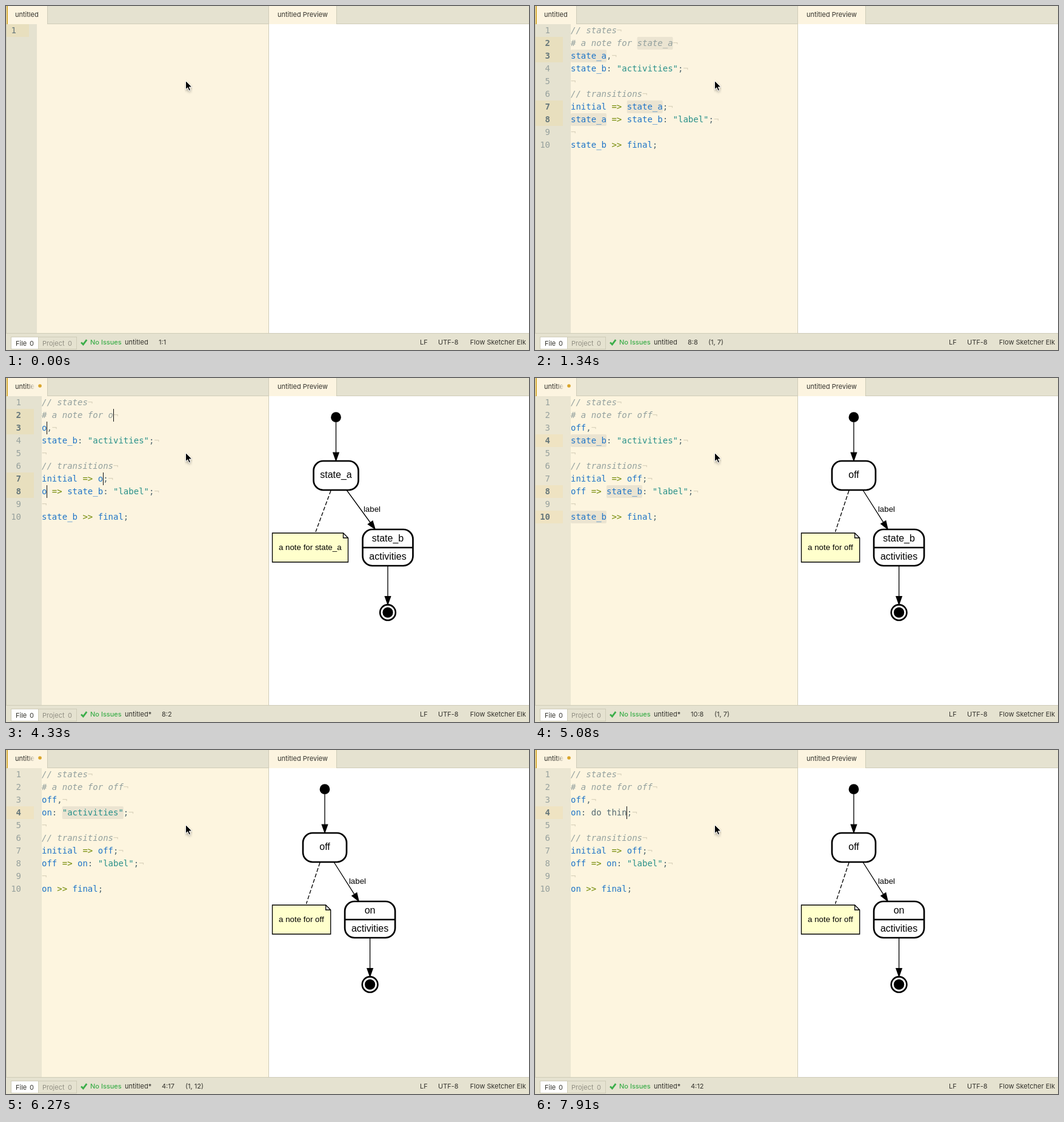
An HTML page that plays this animation: 863x568 px, repeating every 8000 ms.

```html
<!DOCTYPE html>
<html lang="en">
<head>
<meta charset="utf-8">
<title>Editor with live preview</title>
<style>
html, body { margin: 0; width: 863px; height: 568px; overflow: hidden; background: #fff; }
svg { display: block; }
text { white-space: pre; }
.ui { font: 11px Inter, sans-serif; fill: #33322c; }
.code { font: 14px "DejaVu Sans Mono", monospace; }
.chart { font: 16px "Liberation Sans", Arial, sans-serif; text-anchor: middle; }
.chart .small { font-size: 13.33px; }
</style>
</head>
<body>
<svg id="stage" width="863" height="568" viewBox="0 0 863 568"></svg>
<script>
const LOOP = 8000, CHAR = 8.428, ROW = 21, TOP = 30;
const BAR = '#e5e2d0', PAPER = '#fcf4e0', EDGE = '#cfccb8', INK = '#536870';
const BLUE = '#2075c7', TEAL = '#2a918a', OLIVE = '#738a05', GREY = '#93a09e';

const SCRIPT = ['// states', '# a note for {a}', '{a},', '{b}: {c};', '', '// transitions',
  'initial => {a};', '{a} => {b}: "label";', '', '{b} >> final;'];

// Each step changes only the listed properties and keeps the rest.
const steps = [
  [0, { word: '', pos: '1:1', sel: '', caret: false }],
  [150, { caret: true }],
  [450, { caret: false }],
  [750, { caret: true, word: 'f', pos: '1:2', popup: ['fsm', 'fselk skeleton', 1, 12, 202] }],
  [900, { word: 'fs', pos: '1:3', popup: ['fsm', 'fselk skeleton', 2, 12, 202] }],
  [1050, { word: 'fsm', pos: '1:4', popup: ['fsm', 'fselk skeleton', 3, 12, 202] }],
  [1340, { full: true, popup: null, a: 'state_a', b: 'state_b', c: '"activities"', focus: 'a', caret: false, pos: '8:8', sel: '(1, 7)' }],
  [1640, { dirty: 0.5, chart: ['state_a', 'state_b'] }],
  [1790, { dirty: 1 }],
  [4330, { a: 'o', caret: true, pos: '8:2', sel: '' }],
  [4480, { a: 'of', pos: '8:3' }],
  [4780, { a: 'off', pos: '8:4' }],
  [5080, { focus: 'b', caret: false, pos: '10:8', sel: '(1, 7)', chart: ['off', 'state_b'], late: true }],
  [5530, { b: 'o', caret: true, pos: '10:2', sel: '' }],
  [5670, { b: 'on', pos: '10:3' }],
  [6120, { chart: ['off', 'on'] }],
  [6270, { focus: 'c', caret: false, pos: '4:17', sel: '(1, 12)' }],
  [7020, { c: 'do', caret: true, pos: '4:7', sel: '' }],
  [7320, { c: 'do ', pos: '4:8' }],
  [7610, { c: 'do t', pos: '4:9', popup: ['trans', 'full transition', 1, 79, 227] }],
  [7760, { c: 'do th', pos: '4:10', popup: null }],
  [7910, { c: 'do thin', pos: '4:12' }]
];

const rect = (x, y, w, h, fill, more = '') =>
  `<rect x="${x}" y="${y}" width="${w}" height="${h}" fill="${fill}" ${more}/>`;
const text = (x, y, s, more = '') => `<text x="${x}" y="${y}" ${more}>${s}</text>`;
const dot = (x, y, r, more = '') => `<circle cx="${x}" cy="${y}" r="${r}" ${more}/>`;

function paint(line, x, y) {
  if (/^(\/\/|#)/.test(line)) return text(x, y, line, `fill="${GREY}" font-style="italic"`);
  return [...line.matchAll(/"[^"]*"|[=>]>|: [\w ]*|\w+|[^\w\s]/g)].map(m => {
    const s = m[0];
    const fill = s[0] === '"' ? TEAL : /^[=>]>/.test(s) ? OLIVE : /^\w/.test(s) ? BLUE : INK;
    return text(x + m.index * CHAR, y, s, `fill="${fill}"`);
  }).join('');
}

function editor(s) {
  const left = s.full ? 59 : 51;
  const active = new Set();
  let marks = '', words = '', carets = '', gutter = '', numbers = '';
  const putCaret = (col, y) => carets += rect(Math.floor(left + col * CHAR + 0.2), y, 1, ROW, '#111');

  (s.full ? SCRIPT : [s.word]).forEach((pattern, i) => {
    const y = TOP + i * ROW;
    let line = '';
    for (const part of pattern.split(/(\{\w\})/)) {
      const key = /^\{/.test(part) && part[1];
      const start = line.length;
      line += key ? s[key] : part;
      if (!key || key !== s.focus) continue;
      active.add(i);
      if (s.caret) putCaret(line.length, y);
      else marks += rect(left + start * CHAR, y, (line.length - start) * CHAR, ROW, '#ebe4d1', 'rx="2"');
    }
    if (!s.full) {
      active.add(0);
      if (s.caret) putCaret(line.length, y);
    }
    words += paint(line, left, y + 15);
    if (s.full && i < 9) words += text(left + line.length * CHAR, y + 15, '¬', 'fill="#d9d2bc"');
    const on = active.has(i);
    if (on) gutter += rect(1, y, left - 14, ROW, s.late ? '#efe3c2' : '#e8dfbe');
    numbers += text(left - 34, y + 15, i + 1,
      `text-anchor="end" fill="${on ? '#66777a' : '#97a19d'}" ${on && s.full ? 'font-weight="bold"' : ''}`);
  });

  return rect(0, 30, 433, 510, s.late ? '#fdf5df' : PAPER) +
    rect(0, 30, left, 510, s.late ? '#ebe6d2' : BAR) + rect(0, 30, 1, 510, EDGE) +
    `<g class="code">${gutter}${marks}${numbers}${words}${carets}</g>`;
}

function popup([word, note, hit, x, w], y) {
  const tx = x + 39;
  return `<g class="code" transform="translate(0 ${y})">` +
    rect(x, 0, w, 28, '#e4e1d0', 'rx="3" filter="url(#shade)"') +
    rect(x, 0, 29, 28, '#d4d2a4', 'rx="3"') +
    `<path transform="translate(${x + 8} 14)" fill="#7d9800" d="M0-1.5h5V-4.5L10 0 5 4.5V1.5H0zM11.5-4.5h3v9h-3z"/>` +
    text(tx, 19, word.slice(0, hit), 'font-weight="bold"') +
    text(tx + hit * CHAR, 19, word.slice(hit), `fill="${INK}"`) +
    text(tx + word.length * CHAR + 12.6, 18, note, 'style="font-size:12.6px" fill="#89887e"') + '</g>';
}

function arrow(x1, y1, x2, y2) {
  const len = Math.hypot(x2 - x1, y2 - y1);
  const turn = Math.atan2(y2 - y1, x2 - x1) * 180 / Math.PI;
  return `<path transform="translate(${x2} ${y2}) rotate(${turn})" d="M${-len} 0H-13M0 0L-13.3-4.7V4.7z" stroke="#000" stroke-width="1.33"/>`;
}

function chart([a, b]) {
  // Centres and half width of the states, then note edge, dashes, labelled edge.
  const [ax, half, nr, bx, d1, d2, e1, e2, lx] = a === 'off'
    ? [526, 36, 535.7, 600.6, 518, 495.5, 541, 582, 580]
    : [544.5, 37, 564.5, 630, 536, 511, 562, 609, 604];
  const bold = 'stroke="#000" stroke-width="2.67"';
  const thin = 'stroke="#000" stroke-width="1.33"';
  return '<g class="chart">' +
    dot(ax, 64.7, 8.4) + arrow(ax, 73, ax, 136.5) +
    rect(ax - half, 137, half * 2, 48, 'none', `rx="16" ${bold}`) + text(ax, 165, a) +
    `<path d="M${d1} 186L${d2} 254" ${thin} stroke-dasharray="6.5 3"/>` +
    `<path d="M439.5 256H${nr - 8}l8 8V304H439.5zM${nr - 8} 256v8h8" fill="#ffffcc" ${thin}/>` +
    text((439 + nr) / 2, 284, 'a note for ' + a, 'class="small"') +
    arrow(e1, 185, e2, 249.5) + text(lx, 221, 'label', 'class="small"') +
    rect(bx - 41.5, 250, 83, 60, 'none', `rx="16" ${bold}`) +
    `<path d="M${bx - 41.5} 280h83" ${bold}/>` +
    text(bx, 270, b) + text(bx, 300, 'activities') +
    arrow(bx, 310, bx, 374) +
    dot(bx, 387.2, 8.6) + dot(bx, 387.2, 12.8, `fill="none" ${bold}`) + '</g>';
}

function tabs(s) {
  const mark = s.dirty
    ? rect(36, 4, 28, 20, 'url(#fade)') + dot(56, 13, 2.8, `fill="#d9a52c" opacity="${s.dirty}"`) : '';
  return rect(0, 0, 863, 30, BAR) + rect(0, 29, 863, 1, EDGE) +
    rect(1, 0, 67, 30, PAPER) + rect(1, 0, 2, 30, '#d9ae3c') + rect(68, 0, 1, 30, EDGE) +
    rect(434, 0, 111, 30, PAPER) + rect(545, 0, 1, 30, EDGE) +
    text(15, 18, 'untitled') + mark + text(448, 18, 'untitled Preview') +
    rect(433, 0, 1, 540, EDGE);
}

function status(s) {
  const x = s.dirty ? 257 : 252;
  return rect(0, 540, 863, 28, BAR) + rect(0, 540, 863, 1, EDGE) +
    rect(53.5, 546.5, 63, 20, BAR, `stroke="${EDGE}"`) + rect(8.5, 546.5, 45, 20, '#fff', `stroke="${EDGE}"`) +
    text(16, 561, 'File') + text(39, 561, '0') +
    text(60, 561, 'Project', 'fill="#929084"') + text(102, 561, '0', 'fill="#929084"') +
    '<path d="M124 555.5l3.4 3.3 5.8-7.6" fill="none" stroke="#3cae4a" stroke-width="2.8"/>' +
    text(139, 559, 'No Issues', 'fill="#3cae4a" font-weight="500"') +
    text(196, 559, s.dirty ? 'untitled*' : 'untitled') + text(x, 559, s.pos) +
    text(x + (s.pos.length > 3 ? 39 : 34), 559, s.sel) +
    text(683, 559, 'LF') + text(713, 559, 'UTF-8') +
    text(858, 559, 'Flow Sketcher Elk', 'text-anchor="end"');
}

const DEFS = `<defs>
  <linearGradient id="fade"><stop stop-color="${PAPER}" stop-opacity="0"/><stop offset=".42" stop-color="${PAPER}"/></linearGradient>
  <filter id="shade" x="-10%" y="-30%" width="120%" height="180%"><feDropShadow dx="0" dy="2" stdDeviation="2" flood-opacity=".35"/></filter>
</defs>
<style>.ui [fill="#929084"] { fill: #929084; }</style>`;

const POINTER = '<path d="M296.5 123.5v14.3l3.3-3 2.2 5.2 2.5-1-2.2-5.1h4.6z" stroke="#fff" stroke-width="1" filter="url(#shade)"/>';

const draw = s => DEFS + rect(0, 0, 863, 568, '#fff') + editor(s) +
  (s.chart ? chart(s.chart) : '') +
  `<g class="ui">${tabs(s)}${status(s)}</g>` +
  (s.popup ? popup(s.popup, s.full ? 114 : 51) : '') + POINTER;

const state = {};
const scenes = steps.map(([at, change]) => [at, draw(Object.assign(state, change))]);
const stage = document.getElementById('stage');
let shown = -1;

function tick() {
  const t = performance.now() % LOOP;
  const now = scenes.findLastIndex(([at]) => at <= t);
  if (now !== shown) stage.innerHTML = scenes[shown = now][1];
  requestAnimationFrame(tick);
}
tick();
</script>
</body>
</html>
```
